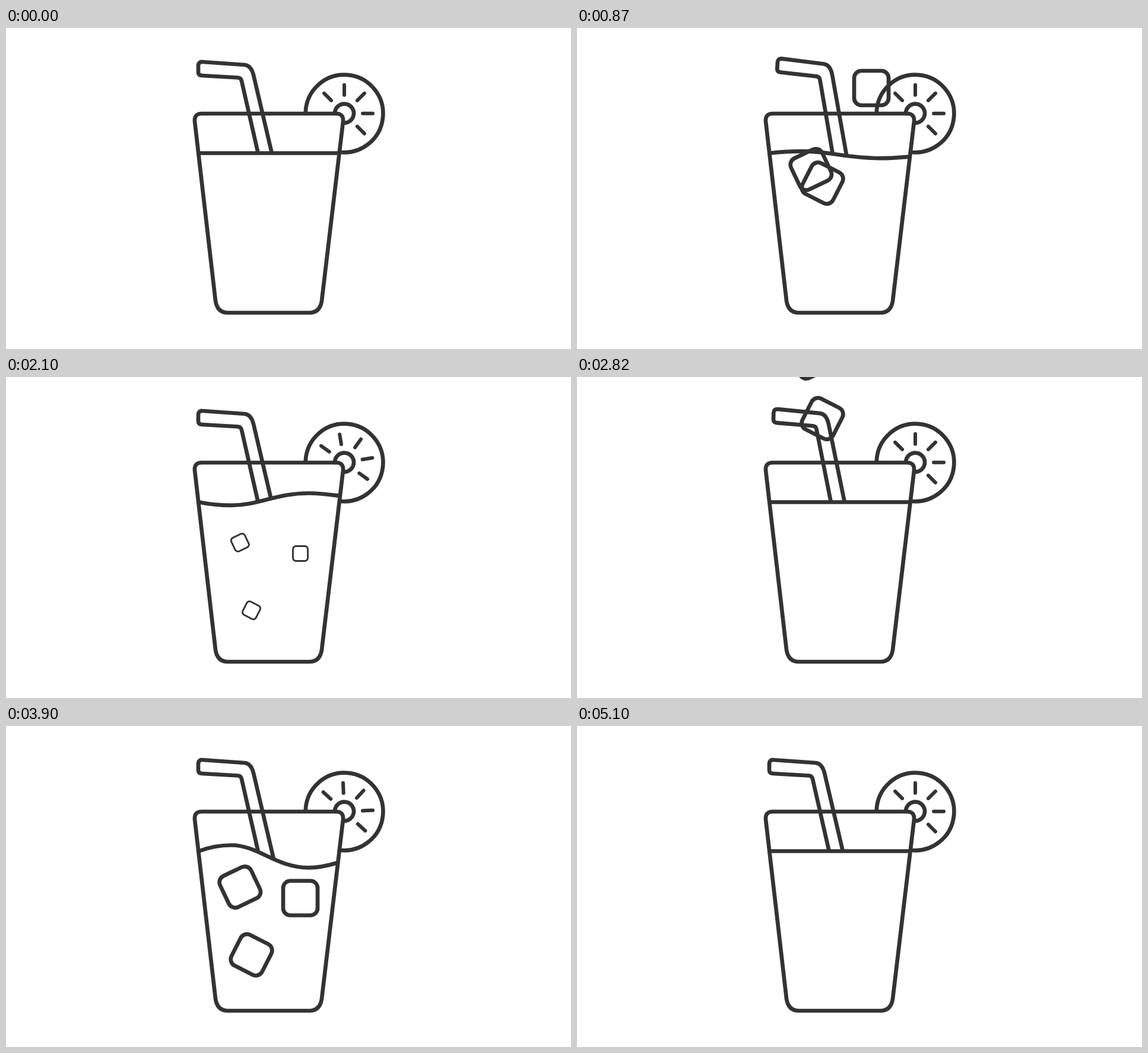
Write an HTML page that moves like this. It is 952x540 px and loops after 5.16 s.

```html
<!DOCTYPE html>
<html lang="en">
<head>
<meta charset="utf-8">
<title>Iced drink</title>
<style>
  html, body { margin: 0; width: 100%; height: 100%; overflow: hidden; background: #fff; }
  svg { display: block; width: 100vw; height: 100vh; }
</style>
</head>
<body>
<svg viewBox="0 0 952 540" fill="none" stroke="#333" stroke-width="6.7" stroke-linecap="round" stroke-linejoin="round">
  <defs><clipPath id="aboveLiquid"><path id="air"/></clipPath></defs>

  <path d="M504.8 141A65.3 65.3 0 1 1 562 208.8"/>
  <path d="M554 144A16 16 0 1 1 568.5 159.5"/>
  <g id="rays" stroke-width="6"></g>

  <g clip-path="url(#aboveLiquid)">
    <path id="straw" d="M459.5 260L417 79Q413 63 402 62L331 57Q324.5 56.5 324 63V73Q323.5 79.5 330 80L391 83.5Q396 84 397 89L436 260"/>
  </g>
  <path id="surface"/>
  <g id="ice"></g>
  <path d="M330 144H556Q569 144 568 157L532 459Q529 479 511 479H374Q356 479 353 459L318 157Q317 144 330 144Z"/>
</svg>
<script>
const PERIOD = 2580, STEP = 30;
const byId = id => document.getElementById(id);
const add = (parent, name, attrs) => {
  const el = document.createElementNS('http://www.w3.org/2000/svg', name);
  for (const key in attrs) el.setAttribute(key, attrs[key]);
  return parent.appendChild(el);
};

// Monotone cubic through [time, value] keys, at rest at both ends.
function follow(t, keys) {
  const last = keys.length - 1;
  if (t <= keys[0][0]) return keys[0][1];
  if (t >= keys[last][0]) return keys[last][1];
  const slope = i => (keys[i + 1][1] - keys[i][1]) / (keys[i + 1][0] - keys[i][0]);
  const tangent = i => {
    if (i === 0 || i === last) return 0;
    const a = slope(i - 1), b = slope(i);
    return a * b > 0 ? 2 * a * b / (a + b) : 0;
  };
  const i = keys.findIndex(k => k[0] > t) - 1;
  const [t0, v0] = keys[i], [t1, v1] = keys[i + 1];
  const d = t1 - t0, u = (t - t0) / d;
  return v0 + (v1 - v0) * u * u * (3 - 2 * u)
    + d * u * (1 - u) * (tangent(i) * (1 - u) - tangent(i + 1) * u);
}

const strawTilt = [[0, 0], [620, 4.9], [1230, 0]];
const waveHeight = [[690, 0], [1200, 30], [2100, -15], [2520, 0]];
const sinking = [[1230, 0], [1830, 8]];
const melting = [[1740, 1], [2400, 0]];

const cubes = [
  { x: 394.3, angle: -25.5, fall: [[150, -60], [240, -32], [500, 190], [870, 238], [1230, 270.5]] },
  { x: 413.5, angle: 27, fall: [[100, -60], [240, 70], [420, 190], [650, 232], [870, 261], [1230, 384.5]] },
  { x: 496, angle: 0, fall: [[690, -60], [870, 101], [1050, 225], [1250, 289]] }
];
for (const cube of cubes)
  cube.el = add(byId('ice'), 'rect', { x: -29, y: -29, width: 58, height: 58, rx: 12 });

for (let angle = -135; angle <= 45; angle += 45)
  add(byId('rays'), 'path', { d: 'M601 143.8H618', transform: `rotate(${angle} 570 143.8)` });

function surfacePath(height) {
  const y = k => 210.5 + k * height;
  const right = 561 - 0.085 * height; // stays on the slanted glass wall
  return `M325 ${y(0)}C343 ${y(-.25)} 361 ${y(-.36)} 380 ${y(-.36)}`
    + `C425 ${y(-.36)} 455 ${y(1)} 510 ${y(1)}C530 ${y(1)} 545 ${y(.85)} ${right} ${y(.7)}`;
}

function draw(t) {
  byId('straw').setAttribute('transform', `rotate(${follow(t, strawTilt)} 437 317)`);

  const wave = surfacePath(follow(t, waveHeight));
  byId('surface').setAttribute('d', wave);
  byId('air').setAttribute('d', wave + 'V0H300V210Z');

  const swing = t > 1230 && t < 2520 ? -11 * Math.sin(Math.PI * (t - 1230) / 1290) : 0;
  byId('rays').setAttribute('transform', `rotate(${swing} 570 143.8)`);

  const size = follow(t, melting);
  byId('ice').setAttribute('visibility', size > 0.01 ? 'visible' : 'hidden');
  for (const { el, x, angle, fall } of cubes) {
    const y = follow(t, fall) + follow(t, sinking);
    el.setAttribute('transform', `translate(${x} ${y}) rotate(${angle}) scale(${size})`);
  }
}

const start = performance.now();
function tick() {
  const t = (performance.now() - start) % PERIOD;
  draw(Math.floor(t / STEP) * STEP);
  requestAnimationFrame(tick);
}
tick();
</script>
</body>
</html>
```
